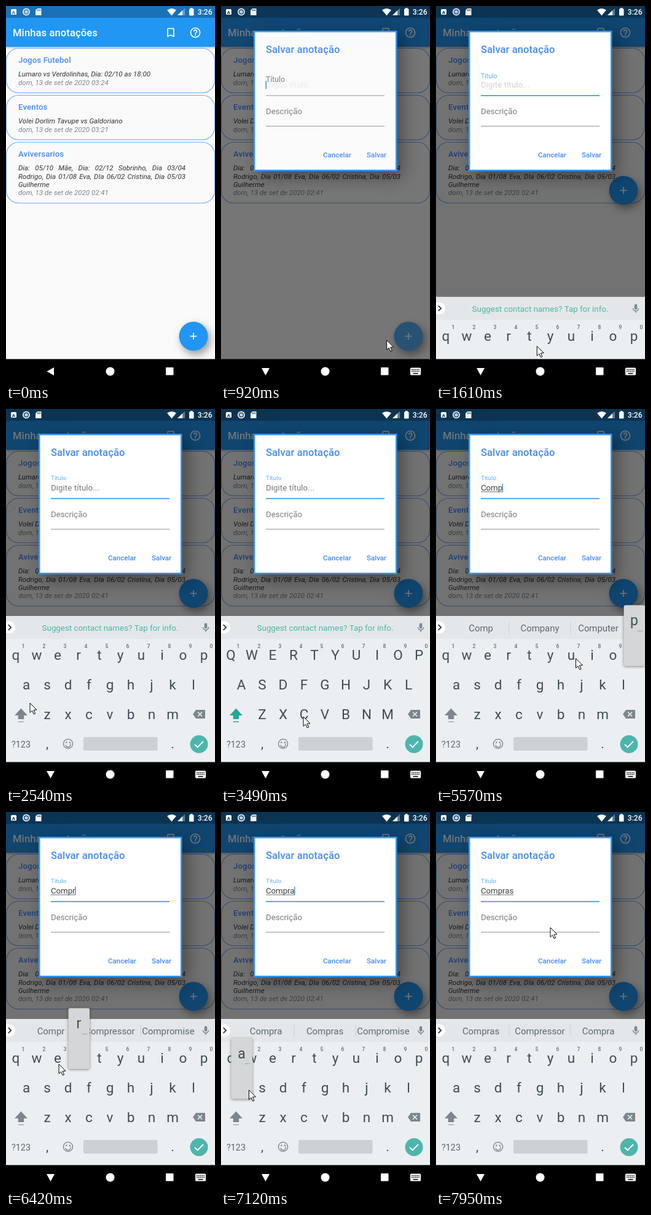
Recreate the animation shown at these times as an HTML page with a canvas. Size 340 by 607 pixels, loop 8 s.

```html
<!DOCTYPE html>
<html lang="pt">
<head>
<meta charset="utf-8">
<title>Minhas anotações</title>
<style>
  html, body { margin: 0; width: 100%; height: 100%; overflow: hidden; background: #000; }
  canvas { display: block; width: 340px; height: 607px; }
</style>
</head>
<body>
<canvas id="stage"></canvas>
<script>
const W = 340, H = 607, LOOP = 8000, STEP = 77.2;
const BLUE = '#2196f3', ACCENT = '#448aff', KEY = '#414d53', ICON = '#7c878d';
const canvas = document.getElementById('stage');
const ctx = canvas.getContext('2d');
const ratio = window.devicePixelRatio || 1;
canvas.width = W * ratio;
canvas.height = H * ratio;

const bookmark = new Path2D('M17 3H7c-1.1 0-2 .9-2 2v16l7-3 7 3V5c0-1.1-.9-2-2-2zm0 15l-5-2.2L7 18V5h10v13z');
const help = new Path2D('M11 18h2v-2h-2v2zm1-16C6.5 2 2 6.5 2 12s4.5 10 10 10 10-4.5 10-10S17.5 2 12 2zm0 18c-4.4 0-8-3.6-8-8s3.6-8 8-8 8 3.6 8 8-3.6 8-8 8zm0-14c-2.2 0-4 1.8-4 4h2c0-1.1.9-2 2-2s2 .9 2 2c0 2-3 1.75-3 5h2c0-2.25 3-2.5 3-5 0-2.2-1.8-4-4-4z');
const mic = new Path2D('M12 14c1.7 0 3-1.3 3-3V5c0-1.7-1.3-3-3-3S9 3.3 9 5v6c0 1.7 1.3 3 3 3zm5-3c0 2.8-2.2 5-5 5s-5-2.2-5-5H5c0 3.5 2.6 6.4 6 6.9V21h2v-3.1c3.4-.5 6-3.4 6-6.9h-2z');

// Key presses: letter and press time; the letter is entered on release.
const RELEASE = 130, POPUP = 380;
const presses = [['c', 3520], ['o', 4170], ['m', 4850], ['p', 5260], ['r', 6090], ['a', 6720], ['s', 7250]];
const taps = [610, 2610, ...presses.map(([, at]) => at)];
const suggestions = {
  2: ['Co', 'Come', 'Could'], 3: ['Com', 'Come', 'Company'], 4: ['Comp', 'Company', 'Computer'],
  5: ['Compr', 'Compressor', 'Compromise'], 6: ['Compra', 'Compras', 'Compromise'],
  7: ['Compras', 'Compressor', 'Compra']
};

// Pointer path: time, x, y
const path = [
  [150, 305, 598], [455, 305, 542], [740, 305, 542], [925, 269, 541], [1380, 180, 560], [1530, 180, 560],
  [2310, 39, 476], [2545, 39, 476], [2610, 39, 493], [2900, 39, 493], [3450, 134, 498], [3700, 134, 498],
  [4150, 279, 394], [4300, 279, 394], [4800, 270, 497], [4990, 270, 497], [5240, 322, 398], [5390, 322, 398],
  [5560, 224, 404], [6060, 113, 412], [6220, 113, 412], [6410, 85, 408], [6690, 20, 450], [6850, 20, 450],
  [7200, 56, 450], [7390, 56, 450], [7900, 186, 187]
];

const rows = [['qwertyuiop', 16, 406], ['asdfghjkl', 33, 454], ['zxcvbnm', 67, 502]];

const clamp01 = v => Math.max(0, Math.min(1, v));
const ramp = (t, from, to) => clamp01((t - from) / (to - from));
const ease = p => p * p * (3 - 2 * p);
const mix = (a, b, p) => a + (b - a) * p;

function text(str, x, y, size, color, { style = '', align = 'left', spacing = 0 } = {}) {
  ctx.font = `${style} ${size}px Roboto, sans-serif`;
  ctx.textAlign = align;
  ctx.letterSpacing = spacing + 'px';
  ctx.fillStyle = color;
  ctx.fillText(str, x, y);
  return ctx.measureText(str).width;
}

function justified(str, x, y, width, size, color, style) {
  ctx.font = `${style} ${size}px Roboto, sans-serif`;
  ctx.letterSpacing = '0px';
  const words = str.split(' ');
  const widths = words.map(w => ctx.measureText(w).width);
  const gap = (width - widths.reduce((a, b) => a + b)) / (words.length - 1);
  words.forEach((word, i) => {
    text(word, x, y, size, color, { style });
    x += widths[i] + gap;
  });
}

function rect(x, y, w, h, color) {
  ctx.fillStyle = color;
  ctx.fillRect(x, y, w, h);
}

function roundRect(x, y, w, h, r, fill, stroke, line = 1) {
  ctx.beginPath();
  ctx.roundRect(x, y, w, h, r);
  if (fill) { ctx.fillStyle = fill; ctx.fill(); }
  if (stroke) { ctx.strokeStyle = stroke; ctx.lineWidth = line; ctx.stroke(); }
}

function disc(x, y, r, color) {
  ctx.beginPath();
  ctx.arc(x, y, r, 0, 7);
  ctx.fillStyle = color;
  ctx.fill();
}

function trace(points) {
  ctx.beginPath();
  points.forEach(([x, y]) => ctx.lineTo(x, y));
}

function polygon(points, color) {
  trace(points);
  ctx.closePath();
  ctx.fillStyle = color;
  ctx.fill();
}

function polyline(points, color, width) {
  trace(points);
  ctx.strokeStyle = color;
  ctx.lineWidth = width;
  ctx.stroke();
}

function icon(shape, cx, cy, size, color) {
  ctx.save();
  ctx.translate(cx - size / 2, cy - size / 2);
  ctx.scale(size / 24, size / 24);
  ctx.fillStyle = color;
  ctx.fill(shape);
  ctx.restore();
}

function withShadow(color, blur, dx, dy, draw) {
  ctx.save();
  ctx.shadowColor = color;
  ctx.shadowBlur = blur * ratio;
  ctx.shadowOffsetX = dx * ratio;
  ctx.shadowOffsetY = dy * ratio;
  draw();
  ctx.restore();
}

function card(y, height, title, lines, date) {
  roundRect(0.5, y, 339, height, 20, '#fafafa', '#6fa8f7', 1.1);
  text(title, 20, y + 23, 13.2, ACCENT, { style: '500', spacing: 0.12 });
  let base = y + 45.7;
  lines.forEach((line, i) => {
    if (i < lines.length - 1) justified(line, 20, base, 272, 11.5, '#333', 'italic');
    else text(line, 20, base, 11.5, '#333', { style: 'italic' });
    base += 13.4;
  });
  text(date, 20, base, 11.5, '#7d8690', { style: 'italic' });
}

function drawPage(t) {
  rect(0, 0, W, H, '#fafafa');
  withShadow('rgba(0,0,0,.35)', 4, 0, 1, () => rect(0, 0, W, 66, BLUE));
  rect(0, 0, W, 19, '#1971b6');
  text('Minhas anotações', 11, 49, 16.5, '#fff', { style: '500', spacing: 0.12 });
  icon(bookmark, 268, 43, 20, '#fff');
  icon(help, 308, 43, 20, '#fff');
  card(68.5, 72, 'Jogos Futebol', ['Lumaro vs Verdolinhas, Dia: 02/10 as 18:00'], 'dom, 13 de set de 2020 03:24');
  card(144.5, 72, 'Eventos', ['Volei Dorlim Tavupe vs Galdoriano'], 'dom, 13 de set de 2020 03:21');
  card(220.5, 98.5, 'Aviversarios', [
    'Dia: 05/10 Mãe, Dia: 02/12 Sobrinho, Dia 03/04',
    'Rodrigo, Dia 01/08 Eva, DIa 06/02 Cristina, Dia 05/03',
    'Guilherme'], 'dom, 13 de set de 2020 02:41');
  const resized = t >= 1600;
  const y = resized ? 298.5 : 534.5;
  withShadow('rgba(0,0,0,.4)', 14, 4, 6, () => disc(305, y, 23.5, BLUE));
  // Touch splash
  if (t > 610 && !resized) disc(305, y, 23.5, 'rgba(255,255,255,.22)');
  rect(299.5, y - 0.8, 11, 1.6, '#fff');
  rect(304.2, y - 5.5, 1.6, 11, '#fff');
}

function drawDialog(t, typed, lastEdit) {
  const shown = ramp(t, 680, 928);
  if (!shown) return;
  rect(0, 0, W, H, `rgba(0,0,0,${0.54 * shown})`);
  ctx.save();
  ctx.globalAlpha = shown;
  withShadow('rgba(0,0,0,.4)', 26, 8, 10, () => rect(53, 40, 233, 227, '#fff'));
  ctx.strokeStyle = '#3396f3';
  ctx.lineWidth = 2.5;
  ctx.strokeRect(54.2, 41.2, 231, 225);
  text('Salvar anotação', 73, 76, 16.5, ACCENT, { style: '500', spacing: 0.1 });

  const lift = 0.3 * ramp(t, 800, 915) + 0.7 * ramp(t, 1500, 1650);
  const focused = t > 1520;
  text('Título', 73, mix(127, 115, lift), mix(13.2, 9.9, lift), focused ? '#5cadf5' : '#7a7a7a');
  if (!typed) {
    ctx.globalAlpha = shown * (lift < 1 ? lift * 0.4 : 1);
    text('Digite título...', 73, 132, 13.2, '#757575', { spacing: 0.1 });
    ctx.globalAlpha = shown;
  }
  const width = typed ? text(typed, 73, 132, 13.2, '#3c3c3c') : 0;
  if (typed) rect(73, 133.5, width, 1, '#666');
  if (t < 1530 || (t - lastEdit) % 1000 < 500) rect(72.5 + width, 121, 1.5, 13.5, '#4a8af0');
  if (focused) rect(73, 144, 193, 2, '#56a9f2');
  else rect(73, 144.5, 193, 1, '#929292');

  text('Descrição', 73, 174.5, 13.2, '#7a7a7a', { spacing: 0.05 });
  rect(73, 194, 193, 1, '#959595');
  text('Cancelar', 166, 245, 11.57, ACCENT, { style: '500' });
  text('Salvar', 237, 245, 11.57, ACCENT, { style: '500' });
  ctx.restore();
}

function drawStrip(typed) {
  rect(0, 335, W, 37, '#e4e7e9');
  disc(5, 353.5, 10, '#fff');
  polyline([[3.8, 349.2], [8.2, 353.5], [3.8, 357.8]], '#333', 1.8);
  const words = suggestions[typed.length];
  if (words) {
    words.forEach((word, i) => text(word, [73, 169, 264][i], 359.5, 14.9, '#5b686f', { align: 'center' }));
    rect(118.5, 345, 1, 19, '#cbd0d3');
    rect(218.5, 345, 1, 19, '#cbd0d3');
  } else {
    text('Suggest contact names? Tap for info.', 169.5, 359, 13.35, '#4bb8a6', { align: 'center' });
  }
  icon(mic, 325, 354, 18, ICON);
}

function drawKeys(upper) {
  const centre = { align: 'center' };
  rows.forEach(([letters, x0, base], row) => [...letters].forEach((letter, i) => {
    const x = x0 + i * 34;
    text(upper ? letter.toUpperCase() : letter, x, base, 22.5, KEY, centre);
    if (!row) text((i + 1) % 10, x + 12, 387, 8.5, '#626d73', { ...centre, style: '500' });
  }));

  const shift = upper ? '#26a69a' : ICON;
  polygon([[24.5, 484.5], [35, 496], [29.2, 496], [29.2, 502], [19.8, 502], [19.8, 496], [14, 496]], shift);
  rect(20, 505.5, 9, 1.5, upper ? shift : '#9fa9ad');
  polygon([[304, 494], [309, 487], [324, 487], [324, 501], [309, 501]], ICON);
  polyline([[312, 490.5], [319, 497.5]], '#eceff1', 1.6);
  polyline([[319, 490.5], [312, 497.5]], '#eceff1', 1.6);

  text('?123', 24.5, 547.5, 14.3, '#5b676d', centre);
  text(',', 67, 549, 21, KEY, centre);
  text('.', 271, 549, 21, KEY, centre);
  ctx.beginPath();
  ctx.arc(101, 542, 7.6, 0, 7);
  ctx.moveTo(105, 544);
  ctx.arc(101, 543.5, 4, 0.1, Math.PI - 0.1);
  ctx.strokeStyle = ICON;
  ctx.lineWidth = 1.4;
  ctx.stroke();
  disc(98.2, 539.8, 1.2, ICON);
  disc(103.8, 539.8, 1.2, ICON);
  roundRect(126, 531, 120.5, 22, 2, '#cdd1d3');
  disc(314, 542.5, 14.5, '#4db6ac');
  polyline([[307, 543], [311.7, 547.5], [321, 538]], '#fff', 1.8);
}

function drawPopup(letter, upper) {
  const row = rows.findIndex(([letters]) => letters.includes(letter));
  const x = rows[row][1] + rows[row][0].indexOf(letter) * 34 + 0.5;
  const y = 317.5 + row * 48.5;
  withShadow('rgba(0,0,0,.45)', 4, 0, 1, () => roundRect(x - 17, y, 34.5, 98.5, 3, '#d4d6d8'));
  text(upper ? letter.toUpperCase() : letter, x, y + 32.5, 23, KEY, { align: 'center' });
  text('...', x + 9.5, y + 42, 11, KEY, { align: 'center' });
}

function drawKeyboard(t, typed) {
  const rise = ease(ramp(t, 1500, 1760));
  if (!rise) return;
  const upper = t > 2900 && t < 3520 + RELEASE;
  ctx.save();
  ctx.translate(0, (1 - rise) * 236);
  rect(0, 335, W, 240, '#eceff1');
  drawStrip(typed);
  drawKeys(upper);
  presses.forEach(([letter, at]) => {
    if (t >= at && t < at + POPUP) drawPopup(letter, letter === 'c');
  });
  ctx.restore();
}

function drawSystemBars(t) {
  const bar = t < 760 ? '#1971b6' : '#0b3454';
  roundRect(8, 5, 9, 9, 1.5, '#fff');
  text('A', 12.5, 12.5, 8, bar, { style: 'bold', align: 'center' });
  disc(33, 9.5, 6, '#e4ebf2');
  disc(33, 9.5, 4, bar);
  disc(33, 9.5, 2.8, '#bcd0e2');
  polygon([[51, 4], [57.5, 4], [57.5, 15], [48, 15], [48, 7]], '#f2f2f2');
  [51, 53, 55].forEach(x => rect(x, 5.5, 1, 2.5, bar));

  ctx.beginPath();
  ctx.moveTo(269.5, 15.5);
  ctx.lineTo(262, 6.5);
  ctx.quadraticCurveTo(269.5, 1.5, 277, 6.5);
  ctx.fillStyle = '#fff';
  ctx.fill();
  polygon([[279, 15], [291, 15], [291, 3.5]], 'rgba(255,255,255,.35)');
  polygon([[279, 15], [287, 15], [287, 7.3]], '#fff');
  rect(300, 3, 3.5, 2, '#fff');
  roundRect(298, 4.5, 7.5, 11, 1, '#fff');
  text('3:26', 335.5, 14, 12, '#fff', { style: '500', align: 'right' });

  rect(0, 571.5, W, 36, '#000');
  if (t < 880) polygon([[66.5, 591.5], [78, 585], [78, 598]], '#fff');
  else polygon([[72.5, 598], [66, 586], [79, 586]], '#fff');
  disc(169.5, 591.5, 7, '#fff');
  roundRect(260, 585, 12.5, 12.5, 1, '#fff');
  if (t >= 880) {
    roundRect(308, 585.5, 17, 12, 1.5, '#fff');
    for (let i = 0; i < 5; i++) {
      rect(310 + i * 2.8, 587.8, 1.6, 1.6, '#000');
      rect(310 + i * 2.8, 590.6, 1.6, 1.6, '#000');
    }
    rect(312.5, 594, 8, 1.5, '#000');
  }
}

function drawPointer(t) {
  if (t < 150) return;
  let i = path.findIndex(([at]) => at > t);
  if (i < 0) i = path.length;
  const [t0, x0, y0] = path[i - 1];
  const [t1, x1, y1] = path[i] || [t0 + 1, x0, y0];
  const p = ramp(t, t0, t1);
  const x = mix(x0, x1, p), y = mix(y0, y1, p);
  if (taps.some(at => t >= at && t < at + RELEASE)) disc(x - 1, y, 12, 'rgba(244,230,50,.85)');
  ctx.save();
  ctx.translate(x, y);
  polygon([[0, 0], [0, 15.5], [3.6, 12.2], [6.2, 18], [8.6, 17], [6.1, 11.3], [11, 11]], '#fff');
  ctx.strokeStyle = '#000';
  ctx.lineWidth = 1;
  ctx.stroke();
  ctx.restore();
}

function render(now) {
  const time = now % LOOP;
  const t = time < 150 ? 0 : 150 + Math.floor((time - 140) / STEP) * STEP;
  const entered = presses.filter(([, at]) => t >= at + RELEASE);
  const typed = 'Compras'.slice(0, entered.length);
  const lastEdit = entered.length ? entered.at(-1)[1] + RELEASE : 850;
  ctx.setTransform(ratio, 0, 0, ratio, 0, 0);
  drawPage(t);
  drawDialog(t, typed, lastEdit);
  drawKeyboard(t, typed);
  drawSystemBars(t);
  drawPointer(t);
}

const start = performance.now();
function tick() {
  render(performance.now() - start);
  requestAnimationFrame(tick);
}
tick();
</script>
</body>
</html>
```
